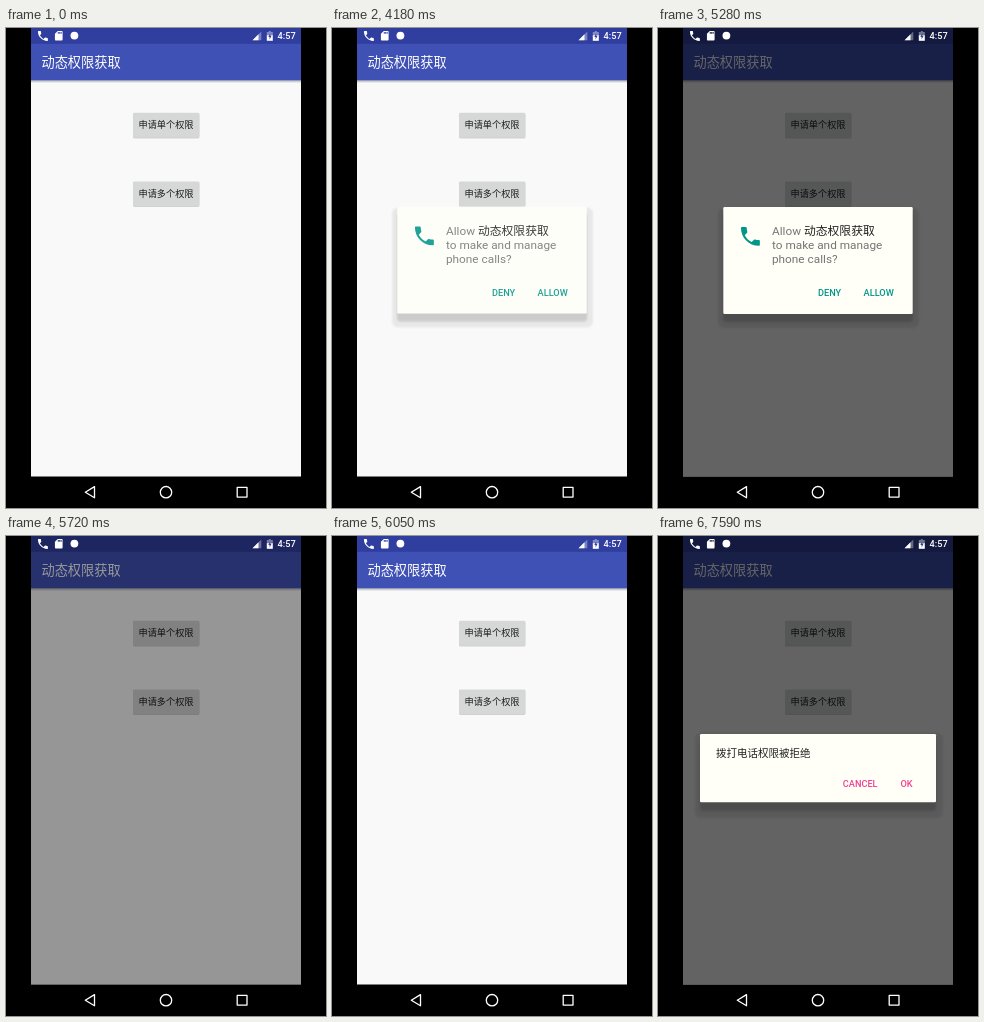
These frames come from a looping animation (320x480 px, 8 s). An HTML page:

```html
<!DOCTYPE html>
<html lang="zh">
<head>
<meta charset="utf-8">
<title>Permission dialogs</title>
<style>
  html, body { margin: 0; width: 100%; height: 100%; overflow: hidden; background: #000; }
  svg { display: block; width: 100%; height: 100%; }
  text { font-family: Roboto, "Noto Sans CJK SC", "Noto Sans CJK", sans-serif; white-space: pre; }
  .label { font-size: 9.18px; text-anchor: middle; fill: #1c1c1c; }
  .action { font-size: 9.18px; font-weight: 500; }
  .teal { fill: #009688; }
  .pink { fill: #ee3f8e; }
  .message { font-size: 11.81px; fill: #757575; }
  .dark { fill: #212121; }
</style>
</head>
<body>
<svg viewBox="0 0 320 480">
  <defs>
    <path id="phone" d="M6.62 10.79c1.44 2.83 3.76 5.14 6.59 6.59l2.2-2.2c.27-.27.67-.36 1.02-.24 1.12.37 2.33.57 3.57.57.55 0 1 .45 1 1V20c0 .55-.45 1-1 1-9.39 0-17-7.61-17-17 0-.55.45-1 1-1h3.5c.55 0 1 .45 1 1 0 1.25.2 2.45.57 3.57.11.35.03.74-.25 1.02l-2.2 2.2z"/>
    <linearGradient id="barShadow" x2="0" y2="1">
      <stop stop-color="#000" stop-opacity=".28"/>
      <stop offset="1" stop-color="#000" stop-opacity="0"/>
    </linearGradient>
    <filter id="soft"><feGaussianBlur stdDeviation="1"/></filter>
    <g id="button">
      <rect x="127" y="-11.6" width="66.4" height="25" rx="1.5" opacity=".16"/>
      <rect x="127" y="-12.2" width="66.4" height="24.4" rx="1.3" fill="#d6d7d7"/>
    </g>
  </defs>

  <!-- app -->
  <rect x="25" width="270" height="448.5" fill="#f9f9f9"/>
  <rect x="25" y="52.4" width="270" height="2.8" fill="url(#barShadow)"/>
  <rect x="25" y="15" width="270" height="37.4" fill="#3f51b5"/>
  <rect x="25" width="270" height="15.8" fill="#303f9f"/>
  <text x="35.5" y="38.9" font-size="13.2" fill="#fff">动态权限获取</text>
  <use href="#button" y="97"/>
  <text class="label" x="160" y="100.4">申请单个权限</text>
  <use href="#button" y="165.7"/>
  <text class="label" x="160" y="169.1">申请多个权限</text>

  <rect id="scrim" x="25" width="270" height="448.5" opacity="0"/>

  <!-- dialogs -->
  <g id="callDialog">
    <rect x="60" y="180" width="201" height="120" rx="6" opacity=".08" filter="url(#soft)"/>
    <rect x="65" y="186" width="190" height="108" rx="3" opacity=".14" filter="url(#soft)"/>
    <rect x="65.3" y="178.9" width="189.4" height="107.2" rx="1.3" fill="#fffff8"/>
    <use href="#phone" class="teal" transform="translate(79.8 195.8) scale(1.05)"/>
    <text class="message" x="114" y="207.3">Allow <tspan class="dark">动态权限获取</tspan></text>
    <text class="message" x="114" y="221.4">to make and manage</text>
    <text class="message" x="114" y="235.4">phone calls?</text>
    <text class="action teal" x="160" y="268.4">DENY</text>
    <text class="action teal" x="205.6" y="268.4">ALLOW</text>
  </g>
  <g id="deniedDialog">
    <rect x="37" y="197" width="248" height="85" rx="6" opacity=".08" filter="url(#soft)"/>
    <rect x="42" y="206" width="236" height="69" rx="3" opacity=".14" filter="url(#soft)"/>
    <rect x="42" y="198" width="236" height="68.2" rx="1.3" fill="#fffff8"/>
    <text class="dark" x="58" y="220.9" font-size="10.5">拨打电话权限被拒绝</text>
    <text class="action pink" x="184.8" y="251.3">CANCEL</text>
    <text class="action pink" x="242.5" y="251.3">OK</text>
  </g>

  <!-- status bar -->
  <g fill="#fff">
    <use href="#phone" transform="translate(30.3 1.4) scale(.55)"/>
    <path transform="translate(47 2) scale(.48)" d="M18 2h-8L4 8v12c0 1.1.9 2 2 2h12c1.1 0 2-.9 2-2V4c0-1.1-.9-2-2-2zm-6 6h-2V4h2zm3 0h-2V4h2zm3 0h-2V4h2z"/>
    <circle cx="68.4" cy="7.6" r="3.9"/>
    <path d="M246.5 12.3h8.8V3.5z" opacity=".35"/>
    <path d="M246.5 12.3h6V6.3z"/>
    <path d="M262.8 3h2v1h2v3.6h-6V4h2z" opacity=".4"/>
    <path d="M260.8 7.2h6v5.6h-6z"/>
    <path d="M264.3 5.2l-2 3.8h1.3v2.6l2-3.8h-1.3z" fill="#303f9f"/>
    <text class="action" x="271.6" y="11.4">4:57</text>
  </g>

  <!-- navigation bar -->
  <g fill="none" stroke="#fff" stroke-width="1.3" stroke-linejoin="round">
    <path d="M79.3 464.2l9.2-5.6v11.2z"/>
    <circle cx="160" cy="464.2" r="5.7"/>
    <rect x="231.2" y="459.3" width="9.8" height="9.8"/>
  </g>
</svg>
<script>
  const LOOP = 8000, TICK = 110, FADE = 330, DIM = 0.6;
  const dialogs = [
    { id: "callDialog", open: 4180, close: 5720 },
    { id: "deniedDialog", open: 6930, close: Infinity },
  ];
  const byId = id => document.getElementById(id);
  const clamp = v => Math.max(0, Math.min(1, v));

  function draw(now) {
    const t = Math.floor((now % LOOP) / TICK) * TICK;
    let dim = 0;
    for (const { id, open, close } of dialogs) {
      const el = byId(id);
      const entering = t < open + TICK;
      el.style.display = t >= open && t < close ? "" : "none";
      el.setAttribute("opacity", entering ? 0.87 : 1);
      el.setAttribute("transform", `translate(0 ${entering ? -0.5 : 0})`);
      const fadeIn = clamp((t - open) / FADE);
      const fadeOut = clamp((t - close + TICK) / FADE);
      dim += DIM * (fadeIn - fadeOut);
    }
    byId("scrim").setAttribute("opacity", dim);
  }

  const start = performance.now();
  function frame() {
    draw(performance.now() - start);
    requestAnimationFrame(frame);
  }
  frame();
</script>
</body>
</html>
```
